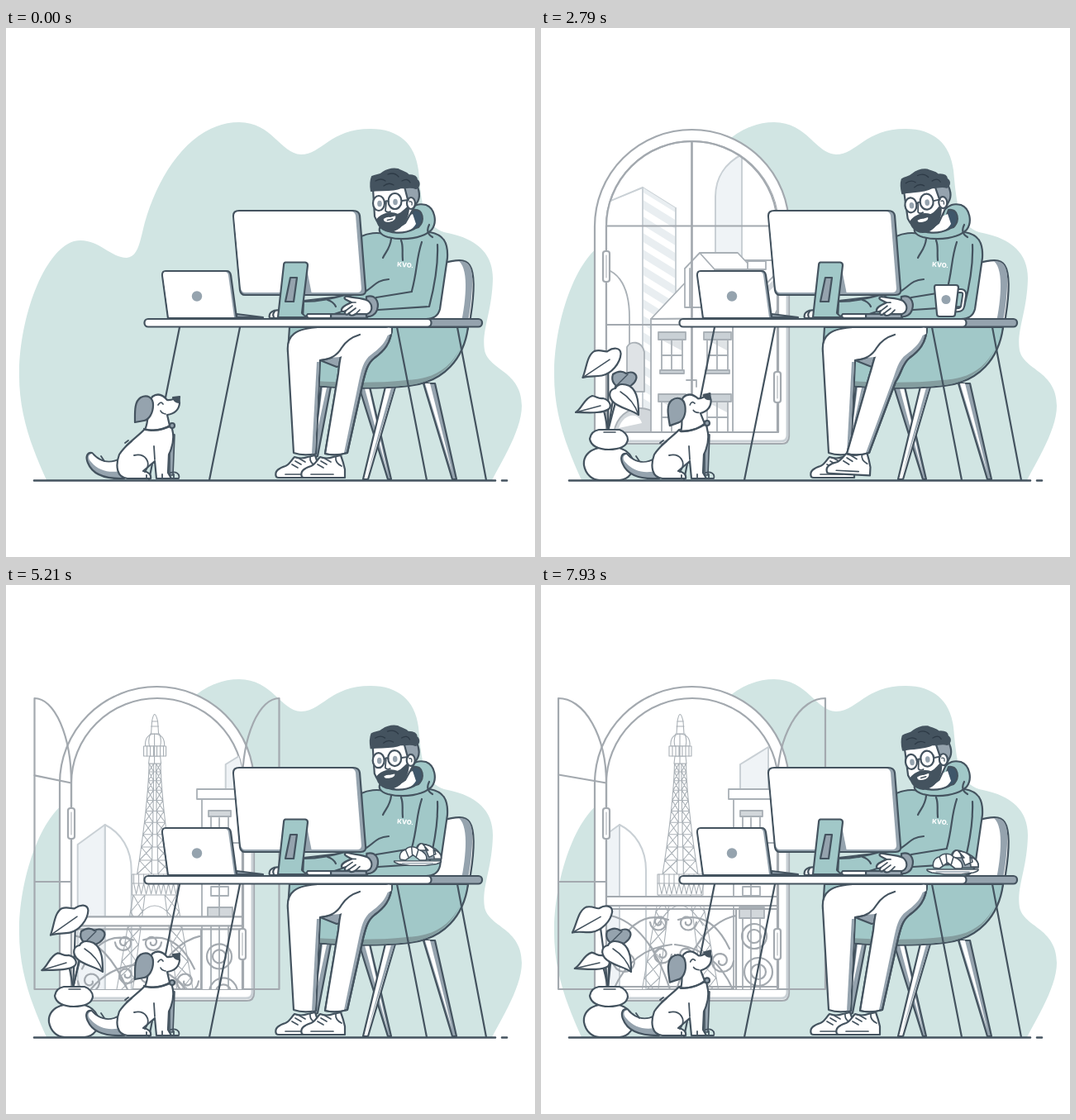
Animation of 640 by 640 pixels, one loop 8 s. Source, as an HTML page:

```html
<!DOCTYPE html>
<html lang="en">
<head>
<meta charset="utf-8">
<title>Working at a desk</title>
<style>
html,body{margin:0;width:100%;height:100%;overflow:hidden;background:#fff}
svg{display:block;width:100vw;height:100vh;stroke-linecap:round;stroke-linejoin:round}
.ink{fill:none;stroke:#44535f;stroke-width:2.2}
.pale{fill:none;stroke:#a3a9af;stroke-width:2.2}
.far{fill:#fff;stroke:#c9d0d5;stroke-width:2}
.near{fill:#fff;stroke:#a9b0b6;stroke-width:1.8}
.fine{fill:#fff;stroke:#a9b0b6;stroke-width:1.1}
.w{fill:#fff}.t{fill:#a1c8c8}.g{fill:#95a3ae}.k{fill:#44535f}.l{fill:#eff3f6}
.n{stroke:none}
.line{fill:none}
#doors *{vector-effect:non-scaling-stroke}
</style>
</head>
<body>
<svg viewBox="0 0 640 640">
<defs>
  <clipPath id="glass"><path d="M79 489V240A104 103 0 0 1 287 240V489Z"/></clipPath>
  <clipPath id="stripeFace"><path d="M123 193L163 218V500H123Z"/></clipPath>
  <g id="shoe">
    <path class="w" d="M2 26C-1 19 6 15 13 13C18 11 20 6 24 2Q32 5 40 2L49 0Q52 8 54 17V27H5Q3 27 2 26Z"/>
    <path class="line" d="M13 23H40M25 7L32 11M21 11L28 15M30 4L37 8M43 2Q42 9 50 13" stroke-width="1.7"/>
  </g>
</defs>
<path fill="#d1e5e3" d="M49 547C30 505 15 465 16 415C17 350 45 270 82 258C110 252 125 278 146 278C160 277 162 258 168 235C185 175 225 114 282 114C322 114 332 152 357 153C382 153 392 122 441 122C475 122 495 140 499 172C503 215 505 238 530 247C563 253 589 268 589 303C588 345 575 365 579 390C584 414 624 415 624 457C624 485 602 520 588 547Z"/>

<g id="window" class="pale">
  <path class="w" d="M65 494V240A117.5 117 0 0 1 300 240V494Q300 503 291 503H74Q65 503 65 494Z"/>
  <path d="M298 300V493Q298 500 290 500H76" stroke="#c9d0d5" stroke-width="3"/>
  <path class="w" d="M79 489V240A104 103 0 0 1 287 240V489Z"/>
  <g clip-path="url(#glass)">
    <g id="town">
      <g id="townFar" class="far">
        <path d="M243 153L291 185V500H243Z"/>
        <path class="l" d="M243 153C224 163 211 180 211 204V500H243Z"/>
        <path d="M70 215L123 193L163 218V500H70Z"/>
        <g id="stripes" clip-path="url(#stripeFace)" stroke="#e9eef1" stroke-width="9"></g>
        <path class="line" d="M123 193V500M163 218V500"/>
      </g>
      <g id="townNear" class="near">
        <path d="M60 292C92 285 107 312 107 350V500H60Z"/>
        <path fill="#dfe3e6" d="M104 440V386C108 378 122 378 125 392V440Z"/>
        <path fill="#d2d7db" d="M88 490C94 450 146 450 151 490Z"/>
        <path class="n w" d="M94 484C100 466 118 464 122 478Z"/>
        <path d="M232 350L300 281L363 345V500H232Z"/>
        <path d="M133 352V500H232V350Z"/>
        <path d="M133 352L200 281H300L232 351Z"/>
        <path class="line" d="M240 351L302 288" stroke="#d2d7db" stroke-width="6"/>
        <path d="M174 338V291L192 272H238L257 292H210V338Z"/>
        <path class="line" d="M174 291L192 272L210 292M180 291V338"/>
        <path d="M250 292V282H272V292Z"/>
        <circle cx="298" cy="350" r="15"/><path class="line" d="M283 350H313M298 335V365"/>
        <g id="houseWindows"></g>
      </g>
    </g>
    <g id="paris">
      <g id="parisFar" class="far">
        <path d="M95 290C115 300 127 320 127 345V500H95Z"/>
        <path class="l" d="M62 314L95 290V500H62Z"/>
        <path class="l" d="M241 500V217L275 196V500Z"/>
      </g>
      <g id="tower" class="fine"></g>
      <g id="parisNear" class="near">
        <path d="M233 500V250H300V500Z"/><path d="M227 247H300V259H227Z"/>
        <path d="M244 280V312H265V280ZM244 365V376H265V365ZM244 395V490H265V395Z"/>
        <path fill="#d2d7db" d="M241 273H268V280H241ZM240 390H270V403H240Z"/>
        <path class="line" d="M254 282V490M235 312H285"/>
      </g>
      <g id="rail" class="pale"></g>
    </g>
  </g>
  <g id="doors">
    <g class="door"><path d="M0 489H1V137A1 103 0 0 0 0 240ZM0 359H1"/><path class="bar"/></g>
    <g class="door"><path d="M0 489H1V137A1 103 0 0 0 0 240ZM0 359H1"/><path class="bar"/></g>
  </g>
  <g class="w"><rect x="75" y="270" width="8" height="37" rx="3"/><rect x="282" y="416" width="8" height="37" rx="3"/></g>
  <path d="M79 275V302M286 421V448" stroke-width="1"/>
</g>

<g class="ink">
  <path d="M34 547.5H592M600 547.5H606" stroke-width="2.6"/>
  <path d="M210 362L173 547M283 362L246 547"/>

  <g id="plant">
    <path id="stemB"/><g id="leafB"><path class="g" d="M92 419C99 414 104 415 108 418C116 414 122 419 120 425C118 432 111 435 102 437C95 433 89 428 92 419Z"/><path d="M110 419L95 434" stroke-width="1.4"/></g>
    <path id="stemA"/><g id="leafA"><path class="w" d="M62 425C66 413 65 398 74 392C82 389 87 393 90 391C96 386 105 385 106 393C106 405 96 418 85 421C77 423 69 422 62 425Z"/><path d="M62 425L93 401" stroke-width="1.5"/></g>
    <path id="stemD"/><g id="leafD"><path class="w" d="M42 465C50 460 52 448 62 445C68 446 69 449 75 448C83 450 86 457 82 461C74 467 54 465 42 465Z"/><path d="M42 465L72 457" stroke-width="1.5"/></g>
    <path id="stemC"/><g id="leafC"><path class="w" d="M119 468C110 461 94 460 87 451C82 444 84 437 91 436C94 430 101 430 108 433C119 440 119 456 119 468Z"/><path d="M119 468Q113 450 97 440" stroke-width="1.5"/></g>
    <path class="w" d="M70 508C56 511 51 520 52 529C54 540 62 547 71 547H95C107 546 113 536 112 526C110 516 104 511 95 508Z"/>
    <path class="w" d="M70 486H95C101 488 105 493 105 498C104 506 95 510 82 510C69 510 60 505 59 497C60 491 64 487 70 486Z"/>
    <path d="M76 489H90" stroke-width="1.6"/>
  </g>

  <g id="dog">
    <g id="tail"><path class="g" d="M138 521C124 529 112 523 104 514C98 513 96 519 99 526C104 539 117 546 143 545Z"/><path class="w n" d="M140 521C124 530 111 524 104 515C99 516 99 521 103 525C113 537 128 539 142 535Z"/></g>
    <path class="g" d="M198 490L204 492L202 541H198Z" stroke-width="1.600"/>
    <path class="w" d="M167 486C160 494 146 502 137 516C132 530 134 544 147 545H175C176 540 172 537 166 536L180 524L182 545H200L196 538 197 516C201 508 203 498 202 490L200 480Z"/>
    <path d="M155 517C168 514 177 525 168 537M180 522L179 506M196 545H209C211 539 205 536 199 538M203 540V545M189 540V545M170 541V545M144 502L148 499M146 505L152 500M115 518L119 524" stroke-width="1.8"/>
    <g id="dogHead">
      <path class="w" d="M168 486C174 475 170 456 177 446C184 441 190 444 195 450C200 451 204 448 209 447L210 454C209 463 202 467 195 468L198 481C190 486 177 488 168 486Z"/>
      <path class="k" d="M202 447L210 446L209 453Q204 453 202 447Z"/>
      <path class="g" d="M163 447C171 443 178 447 178 456C178 466 173 474 167 475L156 477C156 465 155 452 163 447Z"/>
      <path d="M184 456Q187 451 190 455M193 467Q188 466 187 463" stroke-width="1.7"/>
      <path d="M167 485Q184 490 202 480"/><circle class="g" cx="201" cy="481" r="3"/>
    </g>
  </g>

  <g id="chair">
    <path class="g" d="M381 434L372 520L377 518L393 434ZM427 434L462 546H466L440 434ZM505 430L540 546H545L519 430Z"/>
    <path class="w n" d="M383 435L376 490L388 435ZM434 436L462 540L439 436ZM507 430L540 538L513 430Z"/>
    <path class="w" d="M459 434L432 546H438L471 434Z"/><path class="g n" d="M466 435L436 544L470 435Z"/>
    <path class="w" d="M526 285C545 280 556 279 561 287C568 298 566 325 562 350L558 366H515Z"/>
    <path class="g n" d="M548 282C558 282 563 286 564 300C565 323 560 352 557 364L549 365C556 335 561 293 548 282Z"/>
    <path class="t" d="M343 362H559C554 400 530 428 488 433C452 437 405 436 374 433L341 392Z"/>
    <path class="n" fill="#849d9f" d="M550 386C537 414 514 425 485 426C450 430 408 429 374 427V432C410 436 450 436 488 432C520 428 540 410 550 386Z"/>
    <path d="M473 362L509 547M546 362L581 547"/>
  </g>

  <g id="legs">
    <use href="#shoe" x="325" y="517"/>
    <path class="g" d="M380 362H467C466 380 458 390 440 400L400 410L380 402Z"/>
    <path class="w" d="M425 362H380C350 363 339 372 341 392L348 514Q360 518 375 515L380 402C394 400 403 396 408 386Z"/>
    <path class="g n" d="M379 404L374 514L370 515L376 404Z"/>
    <use href="#shoe" id="frontShoe"/>
    <path class="g" id="frontShade"/><path class="w n" id="frontLeg"/><path id="frontEdge"/>
    <path class="n w" d="M376 363H466V370L404 398L380 400Z"/>
    <path d="M380 402C394 401 402 394 406 387C411 379 418 374 428 371"/>
  </g>

  <g id="torso">
    <path class="t" d="M430 252C438 248 450 247 456 249L513 247C529 250 535 259 534 278L525 340Q522 352 508 352H357L360 330L430 322Z"/>
    <path d="M466 255C465 266 460 270 456 278M478 257C481 264 479 270 480 281M503 259C496 280 498 292 491 318M522 262C523 285 519 310 512 337M436 318C446 312 448 305 463 304M448 326L491 319M450 341L512 337"/>
    <path class="t" d="M360 331C380 331 395 327 414 322L424 333C410 345 388 350 359 351Z"/>
    <path d="M389 329Q396 331 399 337"/>
    <path class="t" d="M453 240C450 245 452 250 462 253C482 258 505 254 515 244C522 235 519 218 508 214C499 212 494 214 488 220L480 247Z"/>
    <path fill="#3f576a" d="M493 220C505 219 507 233 499 241L484 246Z"/>
    <path class="w n" d="M468 235L492 225L496 237C489 248 478 250 468 246Z"/>
    <path d="M453 241C465 249 480 250 494 243M512 238Q507 248 516 253"/>
    <text x="473" y="288.5" transform="rotate(5 473 289)" class="n w" font-family="Inter,Arial,sans-serif" font-size="7.8" font-weight="800">KVO.</text>
  </g>

  <g id="head">
    <path class="w" d="M444 194L446 228C451 243 470 246 483 236L496 213L494 190Z"/>
    <path class="g" d="M482 192L497 190C502 201 500 209 495 214L488 215Z"/>
    <path class="k" d="M487 216C482 220 480 224 474 226C465 222 455 225 449 232C450 242 460 248 469 245C480 241 487 230 487 216Z"/>
    <ellipse class="w" cx="490" cy="212" rx="5" ry="7"/>
    <path d="M488 210Q492 209 491 214" stroke-width="1.3"/>
    <path class="k" d="M442 197C441 191 441 185 443 180C448 177 452 179 456 175C462 171 468 170 474 171C479 174 483 174 487 178C493 178 497 180 497 184C501 187 500 192 496 194C489 191 484 194 478 193C466 198 453 195 442 197Z"/>
    <path d="M447 185Q454 181 459 185M462 177Q470 174 475 180M479 185Q486 181 489 187M457 191Q463 186 469 190" stroke="#2d3a46" stroke-width="1.3"/>
    <g class="w"><ellipse cx="451" cy="212" rx="7" ry="9"/><ellipse cx="470.500" cy="209.500" rx="8" ry="9.500"/></g>
    <g class="g n"><ellipse cx="452" cy="212.500" rx="2.800" ry="3.800"/><ellipse cx="471" cy="210.500" rx="2.800" ry="3.800"/></g>
    <path d="M458 211Q460 208 463 210M479 209L487 208M460 211L459 221Q461 224 465 222" stroke-width="1.8"/>
    <g id="mouth"><path class="w n" d="M-8 0Q-3 -3 1 -2L8 -4C9 1 4 4 -3 4Q-8 4 -8 0Z"/><path id="teeth" d="M-3 1.500L4 0" stroke-width="1.6"/></g>
  </g>

  <g id="desk">
    <path class="g" d="M279 346L311 350H279ZM393 346H437V351H393Z"/>
    <path class="w" d="M319 351C317 344 324 340 333 342V351ZM365 346H393V351H362Z"/>
    <path d="M324 350Q322 346 325 343"/>
    <g id="hand">
      <path class="g" d="M436 325C447 322 452 331 449 341C447 347 441 350 436 349Z"/>
      <path class="w" d="M438 330C430 326 421 327 414 325C409 324 408 327 412 329L418 332C411 335 405 338 406 342C407 344 409 343 411 342C408 346 412 348 415 345C416 349 420 348 423 346L437 346C444 343 444 335 438 330Z"/>
      <path d="M411 342L419 336M415 345L423 339M423 346L428 341M418 332L423 332" stroke-width="1.7"/>
    </g>
    <rect class="g" x="490" y="352" width="86" height="9.5" rx="4.500"/>
    <rect class="w" x="167.500" y="352" width="347" height="9.500" rx="4.500"/>
    <path class="g" d="M282 221H420Q427 221 428 227L435 316Q436 323 429 323H289Q284 323 283 317L275 227Q275 221 282 221Z"/>
    <path class="w n" d="M282 222H417Q422 222 423 227L430 315Q430 320 425 320H289Q285 320 284 315L276 228Q276 222 282 222Z"/>
    <path class="g n" d="M364 292L370 322H361Z"/>
    <path class="t" d="M338 283.500H362Q365 284 365 287L358 345Q360 348 365 350H329L336 287Q336 284 338 283.500Z"/>
    <path class="g" d="M344 302H352L348 331H338Z"/>
    <path class="g" d="M193 294H267Q271 294 272 299L279 351H196L189 299Q189 294 193 294Z"/>
    <path class="w n" d="M193 295H265Q268 295 269 299L276 350H197L190 299Q190 295 193 295Z"/>
    <circle class="g n" cx="231" cy="324.500" r="6.200"/>
  </g>

  <g id="mug">
    <path d="M503 318H508Q513 318 512 324L510 337Q509 342 501 341" stroke-width="6"/>
    <path d="M503 318H508Q513 318 512 324L510 337Q509 342 501 341" stroke="#fff" stroke-width="2"/>
    <path class="w" d="M478 311H502Q505 311 505 314L501 346Q501 349 498 349H482Q479 349 479 346L476 314Q476 311 478 311Z"/>
    <circle class="g n" cx="490" cy="328.500" r="5.500"/>
  </g>

  <g id="plate" stroke-width="1.600">
    <path class="g" d="M496 330C494 322 499 315 504 316C516 318 531 326 529 337H500Z"/>
    <path class="w" d="M497 325C498 319 501 315 504 316L512 325ZM506 317C515 318 521 322 522 330L513 334ZM519 324Q530 327 529 336H520Z"/>
    <path class="w" d="M475 337C473 331 476 325 482 324C486 319 495 319 499 324C506 326 512 332 509 338H501L492 331L482 338Z"/>
    <path d="M482 324L486 334M490 321L491 331M499 324L496 334"/>
    <path class="w" d="M467 339H529Q530 341 523 343L508 345H488L473 343Q466 341 467 339Z"/>
    <path d="M478 342H518" stroke="#95a3ae"/>
  </g>
</g>
</svg>
<script>
const LOOP = 8000;
const $ = id => document.getElementById(id);
const clamp = x => Math.min(1, Math.max(0, x));
const span = (t, a, b) => clamp((t - a) / (b - a));
const outCubic = u => 1 - (1 - u) ** 3;
const inOut = u => u < .5 ? 4 * u ** 3 : 1 - 4 * (1 - u) ** 3;
const outBack = u => 1 + 2.2 * (u - 1) ** 3 + 1.2 * (u - 1) ** 2;
const move = (id, value) => $(id).setAttribute('transform', value);
const trace = (id, d) => $(id).setAttribute('d', d);
const show = (id, on) => $(id).setAttribute('visibility', on ? 'visible' : 'hidden');
const scaleAt = (x, y, s) => `translate(${x} ${y}) scale(${s}) translate(${-x} ${-y})`;

// Smoothed interpolation through time, value, time, value...
function keys(t, ...k) {
  for (let i = 0; i < k.length - 2; i += 2) {
    if (t < k[i + 2]) {
      const u = span(t, k[i], k[i + 2]);
      return k[i + 1] + (k[i + 3] - k[i + 1]) * u * u * (3 - 2 * u);
    }
  }
  return k[k.length - 1];
}

function buildTown() {
  let stripes = '';
  for (let y = 190; y < 500; y += 20) stripes += `<path d="M118 ${y}L168 ${y + 31}"/>`;
  $('stripes').innerHTML = stripes;
  let panes = '';
  for (const x of [142, 197]) for (const y of [368, 443]) {
    panes += `<path d="M${x + 4} ${y + 9}h25v38h-25z"/>
      <path class="n" fill="#dfe3e6" d="M${x + 5} ${y + 10}h23v12z"/>
      <path fill="#c9d0d5" d="M${x} ${y}h33v9h-33zM${x + 2} ${y + 46}h29v4h-29z"/>
      <path class="line" d="M${x + 16} ${y + 9}v37M${x + 4} ${y + 28}h25"/>`;
  }
  $('houseWindows').innerHTML = panes + '<path class="line" d="M176 426H188V434"/>';
}

function buildTower() {
  const cx = 168.5, top = 216, base = 350;
  const half = y => 7 + 14.5 * ((y - top) / (base - top)) ** 1.5;
  let d = '';
  for (let i = 0, y = top; i < 10; i++) {
    const y2 = y + 10 + i * .75, a = half(y), b = half(y2);
    for (const s of [-1, 1]) {
      const p = (w, yy) => `${cx + s * w} ${yy}`;
      d += `M${p(a, y)}L${p(b, y2)}L${p(a * .2, y)}V${y2}L${p(a, y)}`;
    }
    d += `M${cx - a} ${y}H${cx + a}`;
    y = y2;
  }
  for (const s of [-1, 1]) {
    const x = w => cx + s * w;
    d += `M${x(26)} 375L${x(48)} 500M${x(12)} 375L${x(28)} 500`;
    for (let i = 0; i < 6; i++) {
      const y = 375 + i * 20;
      d += `M${x(26 + i * 3.5)} ${y}L${x(15 + i * 2.6)} ${y + 20}M${x(12 + i * 2.6)} ${y}L${x(29 + i * 3.5)} ${y + 20}`;
    }
  }
  let hatch = '';
  for (let x = 143; x < 196; x += 6) hatch += `M${x} 361L${x + 3} 374L${x + 6} 361M${x} 350V361`;
  for (let x = 159; x < 182; x += 4) hatch += `M${x} 195V207`;
  $('tower').innerHTML = `
    <path class="line" d="${d}M141 412Q168 364 196 412"/>
    <path d="M141 350H196V375H141Z"/>
    <path d="M161 216L162 207H175L176 216Z"/><path d="M157 195Q156 181 168 180Q181 181 180 195Z"/>
    <path d="M155 195H182V207H155Z"/><path d="M164 180L165 165Q168 148 172 165L173 180Z"/>
    <path class="line" d="M141 361H196M164 171H173M165 165H172M163 180Q160 188 162 195M174 180Q177 188 175 195M168 180V216${hatch}"/>`;
}

function buildRail() {
  const spiral = (x, y, r, dir) => {
    let d = '';
    for (let i = 0; i <= 26; i++) {
      const a = i * .36, q = r * (1 - i / 32);
      d += `${i ? 'L' : 'M'}${(x + dir * q * Math.cos(a)).toFixed(1)} ${(y + q * Math.sin(a)).toFixed(1)}`;
    }
    return d;
  };
  let d = '';
  for (const s of [-1, 1]) {
    const x = w => 160 + s * w;
    d += spiral(x(17), 408, 11, s) + spiral(x(14), 447, 12, -s) + spiral(x(58), 455, 15, s)
      + `M${x(6)} 405Q${x(45)} 392 ${x(68)} 440M${x(76)} 400Q${x(30)} 410 ${x(4)} 489M${x(2)} 435Q${x(50)} 440 ${x(72)} 489`;
  }
  $('rail').innerHTML = `<path class="w" d="M77 377H290V388H77Z"/>
    <path d="M77 392H290M77 486H290M236 392V489${d}"/>
    <circle cx="258" cy="425" r="15"/><circle cx="258" cy="425" r="8"/>
    <circle cx="263" cy="468" r="17"/><circle cx="263" cy="468" r="9"/>`;
}

function drawWindow(t) {
  const open = inOut(span(t, 4450, 5500));
  const pop = outCubic(span(t, 60, 760));
  show('window', pop > 0);
  move('window', scaleAt(182, 503, pop));

  const leaving = span(t, 3450, 5000) ** 3, rise = (1 - outCubic(span(t, 800, 1500))) * 350;
  $('town').style.display = t < 5000 ? '' : 'none';
  move('townFar', `translate(${-220 * leaving} ${rise})`);
  move('townNear', `translate(${-560 * leaving} ${rise * 1.1})`);

  const left = 1 - span(t, 4770, 5600);
  $('paris').style.display = t > 4770 ? '' : 'none';
  move('parisFar', `translate(${240 * left ** 3})`);
  move('tower', `translate(${240 * left ** 4})`);
  move('parisNear', `translate(${240 * left ** 5.4})`);
  move('rail', `translate(0 ${120 * left ** 2.1})`);

  const width = 103.5 * (1 - open * 1.56);
  document.querySelectorAll('.door').forEach((door, i) => {
    door.setAttribute('transform', `translate(${i ? 286 : 79}) scale(${i ? -width : width} 1)`);
    door.querySelector('.bar').setAttribute('d', `M0 239.5L1 ${239.5 - 10 * open}`);
  });
}

// Leaves slide sideways on stems that bend from the pot.
function bendLeaf(name, x, y, shift, tilt) {
  move('leaf' + name, `translate(${shift}) rotate(${tilt * shift} ${x} ${y})`);
  trace('stem' + name, `M${x + shift} ${y}Q${(x + shift) * .7 + 25} ${y * .5 + 225} 81 488`);
}

function drawPlant(t) {
  const pop = outBack(span(t, 150, 800));
  show('plant', t > 150);
  move('plant', scaleAt(82, 547, Math.max(0, pop)));
  bendLeaf('A', 91, 402, keys(t, 150, 12, 800, -22, 1570, 0, 2790, -10, 4430, -8, 5210, -7, 6500, -13, 7930, -21), -.4);
  bendLeaf('B', 95, 434, keys(t, 150, 8, 800, -9, 1570, 0, 2790, -5, 4430, -3, 5210, -1, 6500, -4, 7930, -12), 0);
  bendLeaf('C', 96, 440, keys(t, 150, 8, 800, -8, 1570, 0, 2790, -1, 4430, -3, 5210, -2, 6500, -3, 7930, -10), 0);
  bendLeaf('D', 72, 457, keys(t, 150, 8, 800, -8, 1570, 0, 2790, 0, 4430, 5, 5210, 1, 6500, -2, 7930, -1), -2);
}

function drawPeople(t) {
  const nod = (1 - Math.cos(t / 4800 * 2 * Math.PI)) / 2;
  move('head', `translate(${-1.5 * nod}) rotate(${-5 * nod} 478 240)`);
  const talk = keys(t, 0, 1, 1650, 1, 1950, 0, 5700, 0, 6200, 1, 8000, 1);
  move('mouth', `translate(464 231) scale(${.8 + .1 * talk} ${.65 + .3 * talk})`);
  $('teeth').setAttribute('opacity', talk);
  move('hand', `rotate(${1.5 * Math.sin(t / 90)} 443 340)`);

  const k = keys(t, 1750, 0, 2300, 1, 3100, 1, 3500, 0);
  const x = 16 * k;
  const outer = `M467 362C466 382 457 391 446 399C437 406 ${435 + 2 * k} 416 ${432 - 3 * k} 428L${413 - x} 514Q${399 - x} 518 ${386 - x} 515`;
  const inner = `L${402 - 4 * k} 418C404 400 404 381 428 371`;
  trace('frontShade', outer + inner);
  trace('frontLeg', `M464 362C462 380 451 388 442 395C432 402 430 414 ${427 - 2 * k} 427L${409 - x} 514Q${397 - x} 517 ${387 - x} 514${inner}Z`);
  trace('frontEdge', outer + inner);
  move('frontShoe', `translate(${356 - 12 * k} ${517 - 4 * k}) rotate(${3 * k} 27 27)`);

  move('dogHead', `rotate(${keys(t, 0, 0, 1300, -9, 2900, -9, 3900, 0, 5300, 0, 6400, 5, 7500, -8, 8000, -8)} 182 480)`);
  move('tail', `rotate(${2.5 * Math.sin(t / 170)} 138 535)`);
}

function drawTableware(t) {
  const enter = span(t, 1200, 1850);
  const lag = (1 - enter) ** 1.2 * 34;
  const size = outCubic(span(t, 1200, 1500)) * (1 - span(t, 4750, 5050) ** 2);
  show('mug', size > 0);
  move('mug', `translate(${lag}) rotate(${lag * .55} 490 348) ${scaleAt(490, 330, size)}`);
  const serve = outBack(span(t, 5060, 5480));
  show('plate', t > 5060);
  move('plate', `translate(0 ${keys(t, 6400, -1, 6900, 5)}) ${scaleAt(498, 291, Math.max(0, serve))}`);
}

function frame(now) {
  const t = now % LOOP;
  drawWindow(t);
  drawPlant(t);
  drawPeople(t);
  drawTableware(t);
  requestAnimationFrame(frame);
}

buildTown();
buildTower();
buildRail();
frame(0);
</script>
</body>
</html>
```
